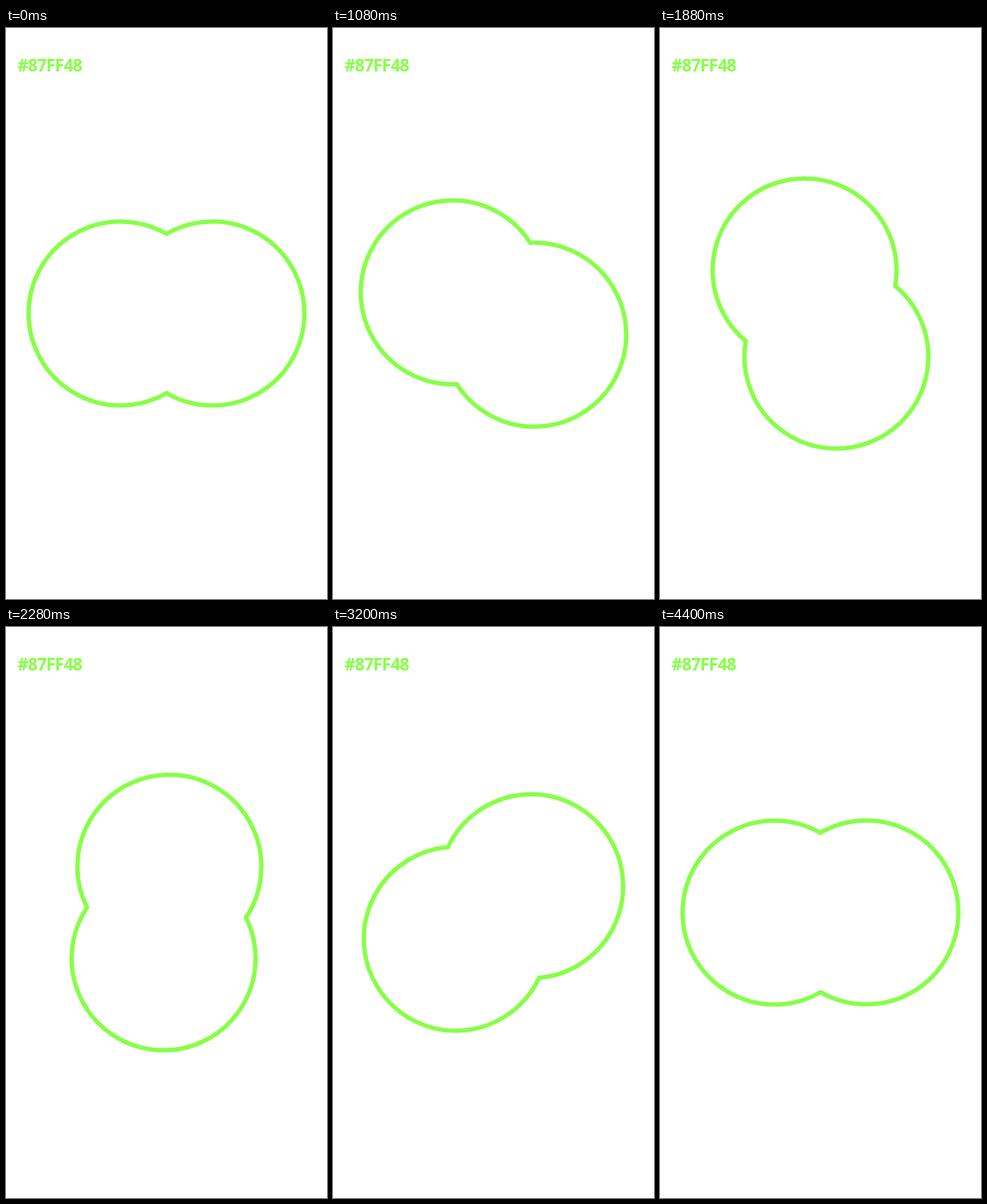
Write an HTML page that moves like this. It is 561 by 998 pixels and loops after 4440 ms.

```html
<!DOCTYPE html>
<html lang="en">
<head>
<meta charset="utf-8">
<title>Rotating outline</title>
<style>
  @property --tick {
    syntax: "<number>";
    inherits: false;
    initial-value: 0;
  }

  html, body {
    margin: 0;
    width: 100%;
    height: 100%;
    overflow: hidden;
    background: #fff;
  }

  svg { display: block; }

  text {
    fill: #87ff48;
    font: 600 30px "Noto Sans", "Open Sans", sans-serif;
    font-stretch: extra-condensed;
    letter-spacing: -1.2px;
  }

  /* Half a turn in 111 steps of 40 ms, eased in and out by a softened smoothstep. */
  .pair {
    --x: calc(var(--tick) / 111);
    --smooth: calc(var(--x) * var(--x) * (3 - 2 * var(--x)));
    fill: none;
    stroke: #87ff48;
    stroke-width: 7.5;
    stroke-linejoin: miter;
    transform: rotate(calc(180deg * (0.96 * var(--smooth) + 0.04 * var(--x))));
    animation: turn 4440ms steps(111) infinite;
  }

  @keyframes turn {
    from { --tick: 0; }
    to { --tick: 111; }
  }
</style>
</head>
<body>
<svg width="561" height="998" viewBox="0 0 561 998">
  <text x="20" y="76">#87FF48</text>
  <g transform="translate(280.5 499)">
    <path class="pair" d="M0-139.2A160.7 160.7 0 1 1 0 139.2A160.7 160.7 0 1 1 0-139.2Z"/>
  </g>
</svg>
</body>
</html>
```
